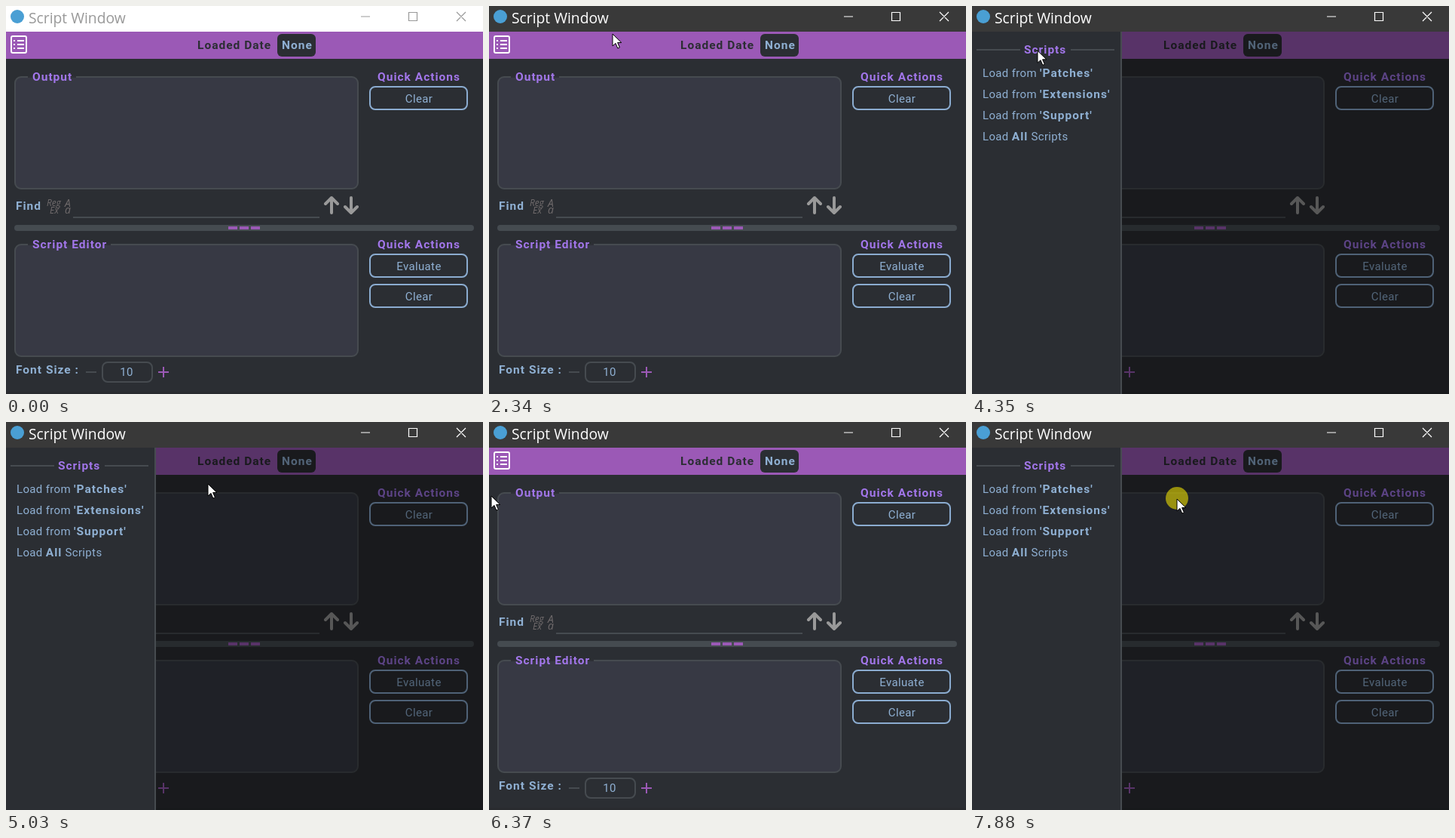
Animation, 633 px wide and 514 px high, one loop 8000 ms. Source, as an HTML page:

```html
<!DOCTYPE html>
<html lang="en">
<head>
<meta charset="utf-8">
<title>Script Window</title>
<style>
  html, body { margin: 0; width: 100%; height: 100%; overflow: hidden; background: #2b2e33; }
  svg { display: block; width: 633px; height: 514px; }
  text { font: 15px Roboto, sans-serif; letter-spacing: .35px; fill: #8fb0d3; white-space: pre; }
  .bold { font-size: 15.5px; font-weight: bold; letter-spacing: 1px; }
  .head { fill: #a276ea; }
  .mid { text-anchor: middle; }
  .tiny { font: italic 12px "Open Sans", sans-serif; letter-spacing: 0; fill: #706b6c; }
  .line { fill: none; stroke: #464b50; stroke-width: 2; }
  .panel { fill: #373944; }
  .button { fill: none; stroke: #8bacd0; stroke-width: 2; }
  .arrow { fill: none; stroke: #999; stroke-width: 4; stroke-linecap: round; stroke-linejoin: round; }
  .purple { fill: #9b59b6; }
  .gap { stroke: #2e3036; stroke-width: 2; }
  .title { font: 19.3px "Open Sans", sans-serif; letter-spacing: 0; fill: currentColor; }
  .pointer { fill: #fff; stroke: #000; stroke-linejoin: round; }
</style>
</head>
<body>
<svg viewBox="0 0 633 514">
  <rect width="633" height="514" fill="#2b2e33"/>
  <rect y="511" width="633" height="3" fill="#292b2f"/>

  <rect class="purple" y="34" width="633" height="36"/>
  <g fill="none" stroke="#fff" stroke-width="2">
    <rect x="7" y="40" width="20" height="22" rx="2"/>
    <path d="M10 46h2m3 0h9M10 51h2m3 0h9M10 56h2m3 0h9"/>
  </g>
  <text class="bold" x="254" y="57" style="fill:#2b2e33">Loaded Date</text>
  <rect x="360" y="37" width="51" height="30" rx="6" fill="#2b2e33"/>
  <text class="bold" x="366" y="57">None</text>

  <rect class="line panel" x="12" y="94" width="455" height="148" rx="8"/>
  <path class="gap" d="M29 94h64"/>
  <text class="bold head" x="35" y="99">Output</text>
  <text class="bold" x="13" y="270">Find</text>
  <text class="tiny" x="54" y="265">Reg</text>
  <text class="tiny" x="58" y="275">Ex</text>
  <text class="tiny" x="78" y="266" style="font-size:14px">A</text>
  <text class="tiny" x="78" y="275" style="font-size:14px">a</text>
  <path class="line" d="M89 280h327"/>
  <path class="arrow" d="M424 262l8-8 8 8M432 254v20M450 266l8 8 8-8M458 274v-20"/>

  <rect x="11" y="290" width="610" height="8" rx="4" fill="#454b50"/>
  <path class="purple" d="M295 292h12v4h-12zM310 292h12v4h-12zM325 292h12v4h-12z"/>

  <rect class="line panel" x="12" y="316" width="455" height="148" rx="8"/>
  <path class="gap" d="M29 316h110"/>
  <text class="bold head" x="35" y="321">Script Editor</text>
  <text class="bold" x="13" y="487">Font Size :</text>
  <path class="line" d="M106 485h14"/>
  <rect class="line" x="128" y="472" width="66" height="26" rx="7"/>
  <text class="mid" x="160" y="490">10</text>
  <path d="M202 485h14m-7-7v14" stroke="#9b59b6" stroke-width="2"/>

  <text class="bold head" x="493" y="99">Quick Actions</text>
  <text class="bold head" x="493" y="321">Quick Actions</text>
  <rect class="button" x="483" y="107" width="129" height="30" rx="7"/>
  <rect class="button" x="483" y="329" width="129" height="30" rx="7"/>
  <rect class="button" x="483" y="369" width="129" height="30" rx="7"/>
  <text class="mid" x="548" y="128">Clear</text>
  <text class="mid" x="548" y="350">Evaluate</text>
  <text class="mid" x="548" y="390">Clear</text>

  <rect id="dim" y="34" width="633" height="480"/>
  <g id="drawer">
    <rect y="34" width="198" height="480" fill="#2b2e33"/>
    <path class="line" d="M198 34v480M6 58h58M131 58h58"/>
    <text class="bold head" x="69" y="63">Scripts</text>
    <text x="14" y="94">Load from <tspan class="bold">'Patches'</tspan></text>
    <text x="14" y="122">Load from <tspan class="bold">'Extensions'</tspan></text>
    <text x="14" y="150">Load from <tspan class="bold">'Support'</tspan></text>
    <text x="14" y="178">Load <tspan class="bold">All</tspan> Scripts</text>
  </g>

  <g id="titleBar">
    <rect id="titleFill" width="633" height="34"/>
    <circle cx="15" cy="14" r="9" fill="#4a9fd4"/>
    <text class="title" x="30" y="23">Script Window</text>
    <path d="M471 14h12M534.5 8.5h11v11h-11zM598 8l12 12M610 8l-12 12" fill="none" stroke="currentColor" stroke-width="1.2"/>
  </g>

  <g id="cursor">
    <circle id="press" cy="-1" r="15" fill="#fff000" opacity=".55"/>
    <path id="pointer" class="pointer" d="M0 0v16l4-3.6 2.8 6.6 2.6-1.1-2.8-6.4h5.2z"/>
    <path id="hand" class="pointer" d="M-2 2q0-2 2-2t2 2v6q3-1 4 1 3-1 4 1 2 0 2 3v4q0 3-2 5H-1l-5-8q-1-3 2-2l2 2z"/>
  </g>
</svg>
<script>
  const LOOP = 8000, STEP = 167.67, DRAWER = 198;
  const el = id => document.getElementById(id);
  const show = (id, on) => el(id).setAttribute('display', on ? 'inline' : 'none');

  // Cursor positions: [step, x, y]
  const path = [
    [4, 620, 471], [6, 420, 140], [7, 320, 12], [8, 287, 23], [12, 287, 23],
    [13, 235, 29], [14, 164, 37], [15, 90, 44], [16, 48, 48], [17, 25, 50], [19, 13, 50],
    [25, 13, 50], [28, 235, 78], [30, 268, 82], [31, 209, 92], [32, 141, 94],
    [34, 5, 97], [35, 9, 98], [36, 9, 98], [38, 3, 98], [40, 3, 98],
    [42, 48, 101], [43, 87, 101], [45, 195, 102], [47, 272, 102]
  ];

  function cursorAt(step) {
    const i = path.findIndex(key => key[0] >= step);
    if (i < 1) return path[0].slice(1);
    const [s0, x0, y0] = path[i - 1], [s1, x1, y1] = path[i];
    const p = (step - s0) / (s1 - s0);
    return [x0 + (x1 - x0) * p, y0 + (y1 - y0) * p];
  }

  function drawerWidth(step, x) {
    if (step === 21) return 118;
    if (step > 21 && step < 31) return DRAWER;
    return step >= 40 ? Math.min(DRAWER, Math.max(0, x - 34)) : 0;
  }

  function draw() {
    const t = performance.now() % LOOP;
    const step = Math.min(47, Math.floor((t + 12) / STEP));
    const [x, y] = cursorAt(step);
    const width = drawerWidth(step, x);
    const active = step >= 10;
    const hand = step >= 17 && step < 26;

    show('drawer', width > 0);
    el('drawer').setAttribute('transform', `translate(${width - DRAWER})`);
    el('dim').setAttribute('opacity', 0.43 * width / DRAWER);
    el('titleFill').setAttribute('fill', active ? '#393939' : '#fff');
    el('titleBar').style.color = active ? '#fff' : '#999';

    show('cursor', step >= 4);
    show('press', step === 10 || step === 20 || step >= 40);
    show('hand', hand);
    show('pointer', !hand);
    el('cursor').setAttribute('transform', `translate(${x} ${y})`);
    requestAnimationFrame(draw);
  }
  draw();
</script>
</body>
</html>
```
